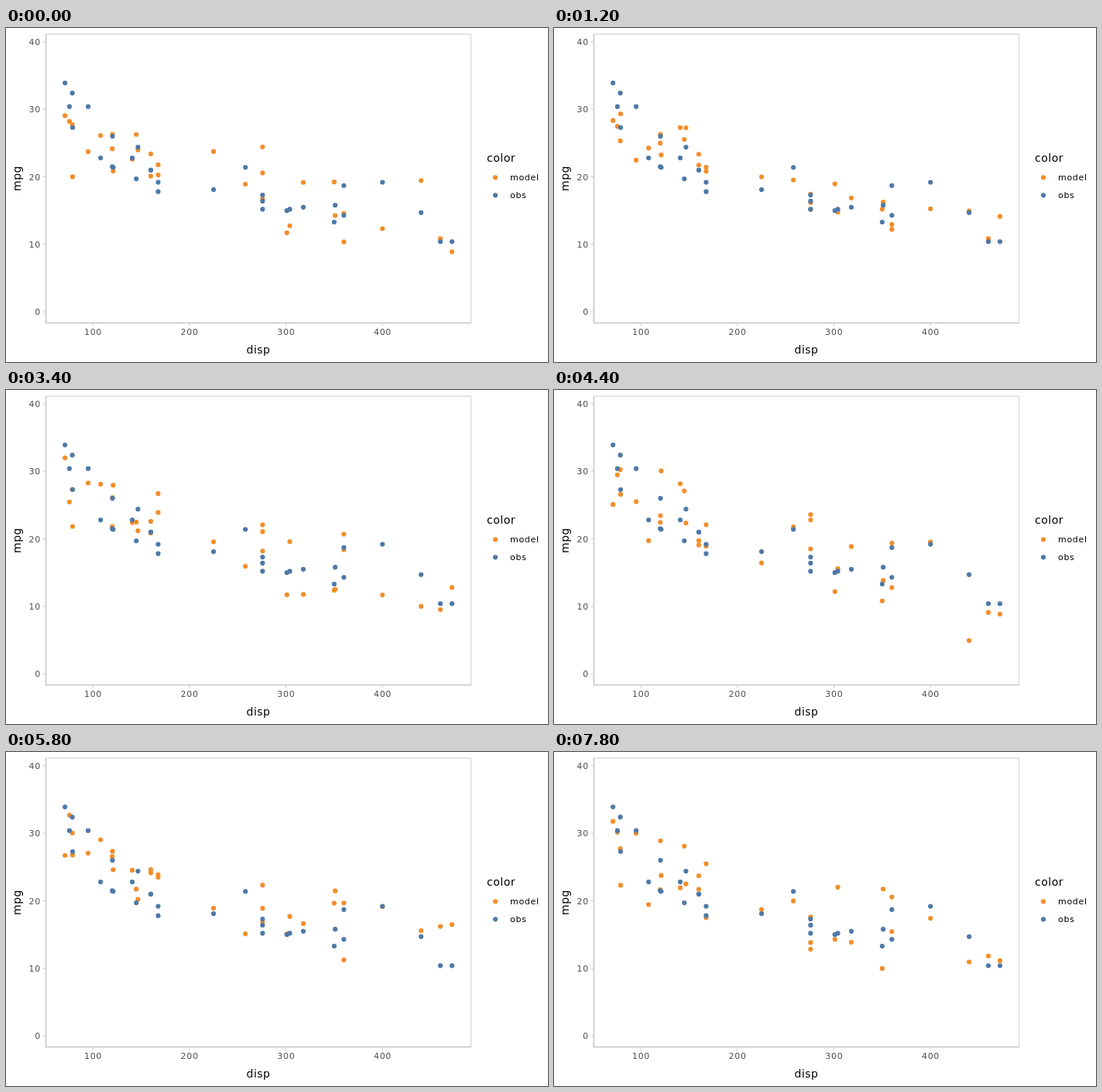
These frames come from a looping animation (700x432 px, 8 s). An HTML page:

```html
<!DOCTYPE html>
<html lang="en">
<head>
<meta charset="utf-8">
<title>Model draws against observations</title>
<style>
  html, body { margin: 0; width: 100%; height: 100%; overflow: hidden; background: #fff; }
  svg { display: block; width: 700px; height: 432px; }
  text { font: 11px "DejaVu Sans", sans-serif; letter-spacing: .7px; }
  .title { font-size: 14px; letter-spacing: .5px; }
  .tick text { fill: #4d4d4d; }
  .tick path { stroke: #ccc; stroke-width: 1; }
  .model { fill: #f28e2b; }
  .obs { fill: #4e79a7; }
</style>
</head>
<body>
<svg viewBox="0 0 700 432">
  <rect x="51.5" y="8" width="549" height="373.5" fill="none" stroke="#d9d9d9" stroke-width="1.4"/>
  <path d="M51.5 8V381.5H600.5" fill="none" stroke="#cacaca" stroke-width="1.6"/>
  <g id="axes" class="tick"></g>
  <text class="title" x="326" y="421" text-anchor="middle">disp</text>
  <text class="title" transform="translate(18.5 194.5) rotate(-90)" text-anchor="middle">mpg</text>
  <text class="title" x="621" y="173">color</text>
  <circle class="model" cx="632" cy="193.3" r="3.1"/>
  <circle class="obs" cx="632" cy="216.3" r="3.1"/>
  <text x="651" y="197.3">model</text>
  <text x="651" y="220.3">obs</text>
  <g id="model" class="model"></g>
  <g id="obs" class="obs"></g>
</svg>
<script>
const STEP = 200, STEPS = 40, SPREAD = 2.9;

// Observed mpg values by displacement
const observed = {
  71.1: [33.9], 75.7: [30.4], 78.7: [32.4], 79: [27.3], 95.1: [30.4], 108: [22.8],
  120.1: [21.5], 120.3: [26], 121: [21.4], 140.8: [22.8], 145: [19.7], 146.7: [24.4],
  160: [21, 21], 167.6: [19.2, 17.8], 225: [18.1], 258: [21.4], 275.8: [16.4, 17.3, 15.2],
  301: [15], 304: [15.2], 318: [15.5], 350: [13.3], 351: [15.8], 360: [14.3, 18.7],
  400: [19.2], 440: [14.7], 460: [10.4], 472: [10.4]
};

const xAt = disp => 112.2 + (disp - 100) * 1.2467;
const yAt = mpg => 367.2 - mpg * 8.735;
const predict = (disp, mpg) => 20.8 - 0.027 * disp + 0.3 * mpg;

function add(parent, tag, attributes, text = "") {
  const node = document.createElementNS("http://www.w3.org/2000/svg", tag);
  for (const name in attributes) node.setAttribute(name, attributes[name]);
  node.textContent = text;
  return parent.appendChild(node);
}

const axes = document.getElementById("axes");
for (let disp = 100; disp <= 400; disp += 100) {
  const x = xAt(disp);
  add(axes, "path", { d: `M${x} 382v3.5` });
  add(axes, "text", { x: x + 0.3, y: 397, "text-anchor": "middle" }, disp);
}
for (let mpg = 0; mpg <= 40; mpg += 10) {
  const y = yAt(mpg);
  add(axes, "path", { d: `M51 ${y}h-3.5` });
  add(axes, "text", { x: 45, y: y + 4, "text-anchor": "end" }, mpg);
}

const dot = (id, disp, mpg) =>
  add(document.getElementById(id), "circle", { cx: xAt(disp), cy: yAt(mpg), r: 3.1 });

const predictions = [];
for (const [key, values] of Object.entries(observed)) {
  const disp = Number(key);
  for (const mpg of values) {
    const mean = predict(disp, mpg);
    dot("obs", disp, mpg);
    predictions.push({ mean, node: dot("model", disp, mean) });
  }
}

function seededRandom(seed) {
  return () => {
    seed = (seed + 0x6d2b79f5) | 0;
    let t = Math.imul(seed ^ (seed >>> 15), 1 | seed);
    t = (t + Math.imul(t ^ (t >>> 7), 61 | t)) ^ t;
    return ((t ^ (t >>> 14)) >>> 0) / 2 ** 32;
  };
}

// Each step is an independent, roughly normal draw around the prediction.
function showDraw(step) {
  const random = seededRandom(step * 7919);
  const normal = () => (random() + random() + random() + random() - 2) * Math.sqrt(3);
  for (const { mean, node } of predictions) {
    node.setAttribute("cy", yAt(mean + SPREAD * normal()));
  }
}

const start = performance.now();
let shown = -1;
function tick() {
  const step = Math.floor((performance.now() - start) / STEP) % STEPS;
  if (step !== shown) showDraw(shown = step);
  requestAnimationFrame(tick);
}
tick();
</script>
</body>
</html>
```
